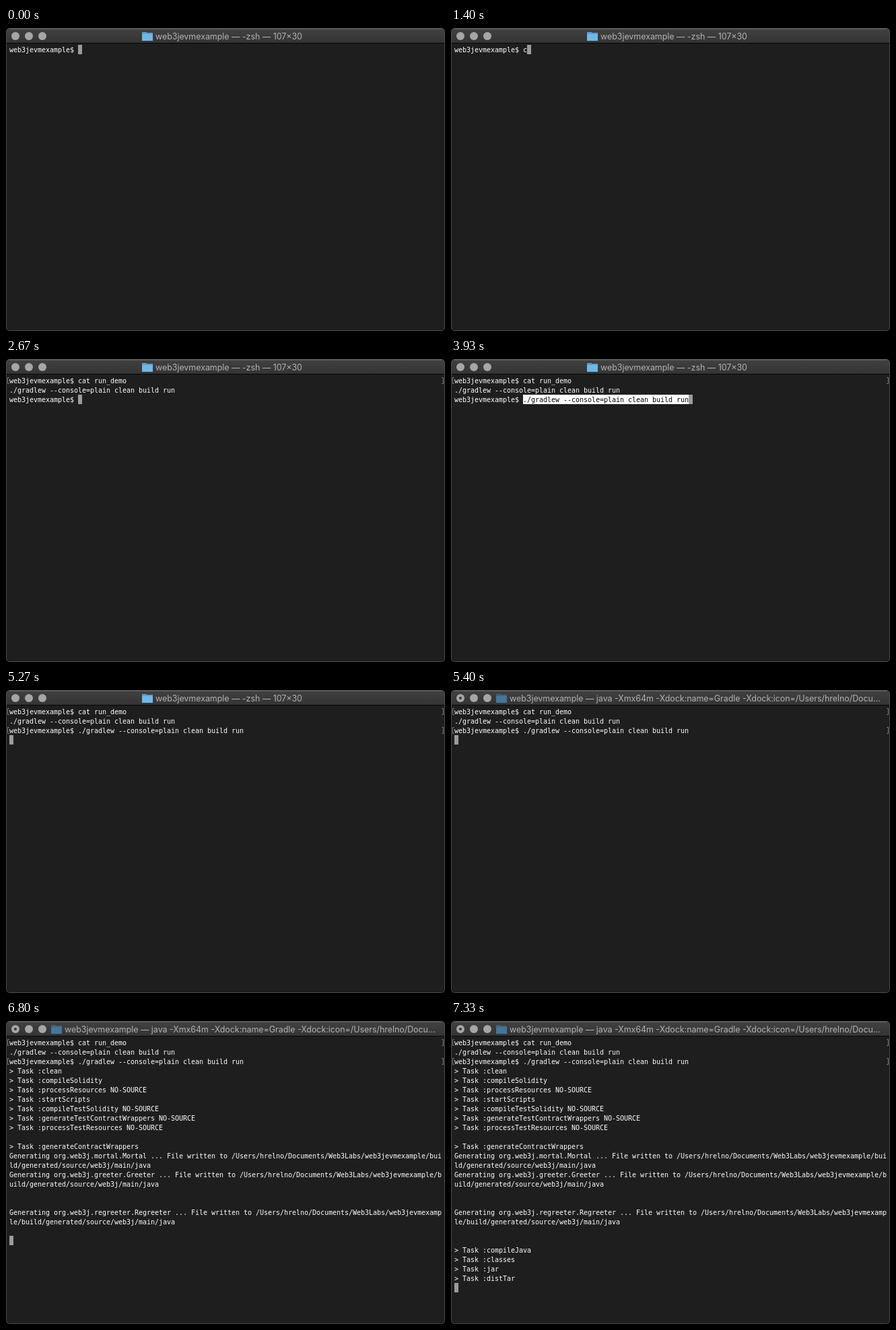
Animation, 652 px wide and 450 px high, one loop 8000 ms. Source, as an HTML page with a canvas:

```html
<!DOCTYPE html>
<html lang="en">
<head>
<meta charset="utf-8">
<title>Terminal</title>
<style>
html, body { margin: 0; width: 652px; height: 450px; overflow: hidden; background: #000; }
canvas { display: block; }
</style>
</head>
<body>
<canvas id="stage" width="652" height="450"></canvas>
<script>
const g = document.getElementById('stage').getContext('2d');
const LOOP = 8000, COLS = 107, CELL = 6, ROW = 14, LEFT = 5, TOP = 25;
const PASTED = 3930, SECOND_RUN = 5270, FIRST_RUN = 2200, BUSY = 5400;

const prompt = 'web3jevmexample$ ';
const command = './gradlew --console=plain clean build run';
const tasks = (...names) => names.map(name => `> Task :${name}\n`).join('');
const wrapper = name =>
  `Generating org.web3j.${name.toLowerCase()}.${name} ... File written to ` +
  '/Users/hrelno/Documents/Web3Labs/web3jevmexample/build/generated/source/web3j/main/java\n';

// Each entry: start time, number of characters kept from the text so far, text added.
const edits = [
  [0, prompt], [1400, 'c'], [1530, 'a'], [1730, 't'], [1830, ' '], [1930, 'r'],
  [2070, 'un_demo'],
  [2670, `\n${command}\n${prompt}`],
  [PASTED, command],
  [SECOND_RUN, '\n'],
  [6400, tasks('clean')],
  [6730, tasks('compileSolidity', 'processResources NO-SOURCE')],
  [6800, tasks('startScripts', 'compileTestSolidity NO-SOURCE',
    'generateTestContractWrappers NO-SOURCE', 'processTestResources NO-SOURCE') +
    '\n' + tasks('generateContractWrappers') + wrapper('Mortal') + wrapper('Greeter') +
    '\n\n' + wrapper('Regreeter') + '\n'],
  [7130, '\n' + tasks('compileJava', 'classes', 'jar')],
  [7330, tasks('distTar')]
];

function box(x, y, w, h, color) {
  g.fillStyle = color;
  g.fillRect(x, y, w, h);
}

function disc(x, y, r, color) {
  g.fillStyle = color;
  g.beginPath();
  g.arc(x, y, r, 0, Math.PI * 2);
  g.fill();
}

function drawFolder(x, busy) {
  box(x, 6, 7, 3, busy ? '#3c6483' : '#58a0d2');
  box(x, 7, 16, 12, busy ? '#3c6483' : '#58a0d2');
  box(x, 9, 16, 10, busy ? '#477696' : '#70b7e7');
}

function drawWindow(busy) {
  box(0, 0, 652, 450, '#000');
  g.beginPath();
  g.roundRect(0.5, 0.5, 651, 449, 5);
  g.fillStyle = '#1e1e1e';
  g.fill();
  g.save();
  g.clip();
  const bar = g.createLinearGradient(0, 1, 0, 22);
  bar.addColorStop(0, '#414141');
  bar.addColorStop(1, '#343434');
  box(0, 0, 652, 22, bar);
  box(0, 22, 652, 1, '#050505');
  g.restore();
  g.strokeStyle = '#4c4c4c';
  g.stroke();
  box(5, 1, 642, 1, '#646464');

  for (const x of [14, 34, 54]) disc(x, 12, 6, '#a6a6a6');
  if (busy) disc(14, 12, 2, '#343434');
  const x = busy ? 67 : 202;
  drawFolder(x, busy);
  g.font = '12.4px Inter, sans-serif';
  g.fillStyle = '#b4b4b4';
  g.fillText('web3jevmexample — ' + (busy
    ? 'java -Xmx64m -Xdock:name=Gradle -Xdock:icon=/Users/hrelno/Docu…'
    : '-zsh — 107×30'), x + 20, 17);
}

function drawBrackets(row) {
  const y = TOP + row * ROW + 2.5;
  g.strokeStyle = '#858585';
  g.beginPath();
  for (const [edge, dir] of [[2.5, 1], [649.5, -1]]) {
    g.moveTo(edge + 2 * dir, y);
    g.lineTo(edge, y);
    g.lineTo(edge, y + 9);
    g.lineTo(edge + 2 * dir, y + 9);
  }
  g.stroke();
}

function drawText(text, selected) {
  let row = 0, col = 0;
  const selectFrom = selected ? text.length - command.length : text.length;
  g.font = '10px "DejaVu Sans Mono", monospace';
  [...text].forEach((char, i) => {
    if (char === '\n') {
      row++;
      col = 0;
      return;
    }
    if (col === COLS) {
      row++;
      col = 0;
    }
    const x = LEFT + col++ * CELL, y = TOP + row * ROW;
    if (i >= selectFrom) box(x, y + (row ? 0 : 1), CELL, ROW, '#fff');
    g.fillStyle = i >= selectFrom ? '#000' : '#fff';
    g.fillText(char, x, y + 11);
  });
  box(LEFT + col * CELL, TOP + row * ROW, CELL, ROW, '#9b9b9b');
}

function draw(now) {
  const t = now % LOOP;
  const text = edits.filter(([start]) => t >= start).map(([, added]) => added).join('');
  drawWindow(t >= BUSY);
  if (t >= FIRST_RUN) drawBrackets(0);
  if (t >= SECOND_RUN) drawBrackets(2);
  drawText(text, t >= PASTED && t < SECOND_RUN);
  requestAnimationFrame(draw);
}
requestAnimationFrame(draw);
</script>
</body>
</html>
```
